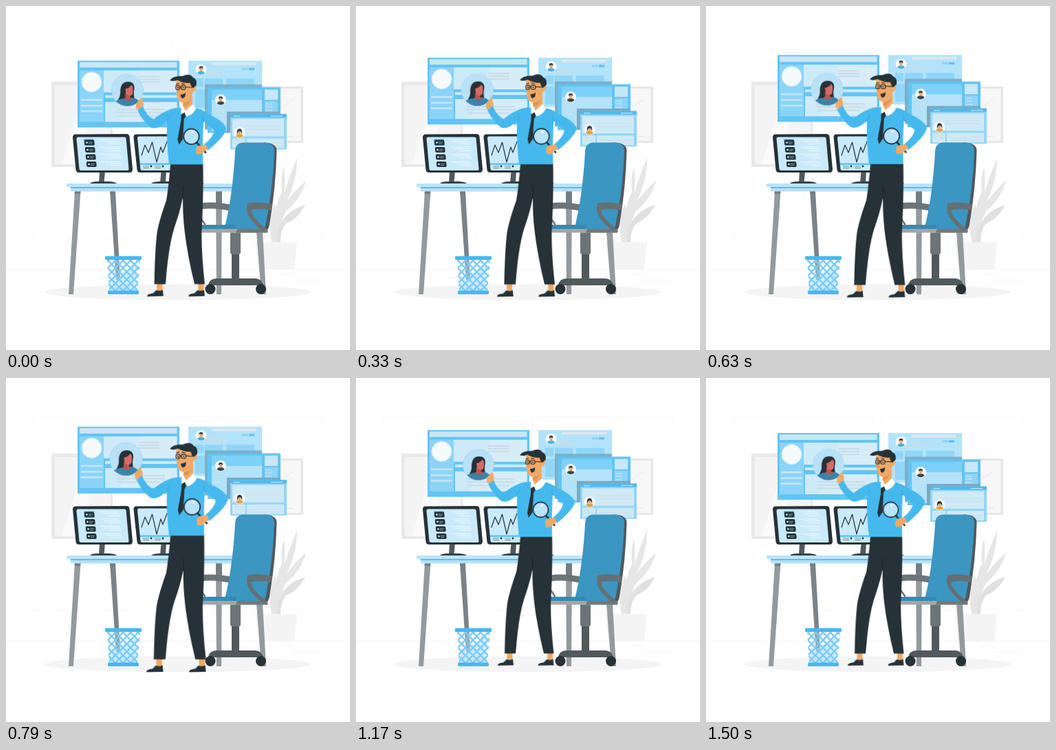
These frames come from a looping animation (500 px wide and 500 px high, 1540 ms). An HTML page without scripts:

```html
<!DOCTYPE html>
<html lang="en">
<head>
<meta charset="utf-8">
<title>Reviewing candidates</title>
<style>
html, body { margin: 0; width: 100%; height: 100%; overflow: hidden; background: #fff; }
svg { display: block; width: 100vw; height: 100vh; }
.windows { animation: float 1540ms linear -40ms infinite; }
.man { transform-origin: 236.5px 260.5px; animation: heartbeat 1540ms linear -40ms infinite; }
@keyframes float { 50% { transform: translateY(-10px); } }
@keyframes heartbeat {
  0%, 30%, 40%, 60%, 100% { transform: scale(1); }
  10%, 50% { transform: scale(1.1); }
}
.dark { fill: #263238; }
.steel { fill: #50595d; }
.grey { fill: #939a9e; }
.blue { fill: #45b9ee; }
.skin { fill: #efa968; }
.line { fill: none; stroke-linecap: round; stroke-linejoin: round; }
</style>
</head>
<body>
<svg viewBox="0 0 500 500" xmlns="http://www.w3.org/2000/svg">
<defs>
  <pattern id="mesh" width="11" height="11" x="148" y="370" patternUnits="userSpaceOnUse">
    <path d="M-1 -1L12 12M12 -1L-1 12" stroke="#7bcbf5" stroke-width="2.4"/>
  </pattern>
  <clipPath id="lens"><circle cx="178" cy="126" r="22.5"/></clipPath>
  <g id="thumb">
    <rect x="-7" y="-4" width="14.5" height="8" rx="2" class="dark" transform="skewX(5)"/>
    <circle cx="-3.5" r="1.3" fill="#d8effa"/>
    <path d="M-1 -.5H5M-1 1.500H4" stroke="#9fd5f2" stroke-width=".6"/>
  </g>
  <g id="avatar">
    <circle r="8" fill="#f5fafc"/>
    <path d="M-5.500 5Q-4.500 2 0 2Q4.500 2 5.500 5Q0 9.500 -5.500 5" fill="currentColor"/>
    <path d="M-2 -3H2V1Q0 4.500 -2 1Z" class="skin"/>
    <path d="M-2.500 -1Q-4 -5 0 -5Q4 -5 2.500 -1L1.500 -2.500H-1.500Z" class="dark"/>
  </g>
  <g id="shoe">
    <path d="M13.500 -19H21.500V-8H13.500Z" class="skin"/>
    <path d="M6 -4L11.500 -9.500L14 -8L12 -3Z" fill="#b4e4fa"/>
    <path d="M0 0Q-.5 -3 5 -4L8.500 -4.500L13 -9Q18 -7 22 -9.500L23 -.5Z" class="dark"/>
  </g>
</defs>

<!-- Room -->
<g fill="none" stroke="#fafafa">
  <rect x="39.500" y="55.500" width="203" height="282"/>
  <rect x="255.500" y="55.500" width="205" height="282"/>
  <path d="M0 382.500H500M400 389.500H418M418 398.500H459M135 395.500H171" stroke="#f4f4f4"/>
</g>
<path d="M66 110H155V234H66Z" fill="#e9e9e9"/>
<path d="M71 115H152V230H71Z" fill="#f4f4f4"/>
<path d="M81 230L106 150H128L103 230Z" fill="#fafafa"/>
<path d="M330 117H432V199H330Z" fill="#e6e6e6"/>
<path d="M334 120H428.500V196H334Z" fill="#f7f7f7"/>
<path d="M398 149L417 136M406 189.500H418" stroke="#e4e4e4"/>
<ellipse cx="249.500" cy="416" rx="194" ry="11.500" fill="#f4f4f4"/>
<path d="M362 343H423L419 383H367Z" fill="#f4f4f4"/>
<g fill="#e6e6e6">
  <path d="M386 343Q380 310 391 287Q396 300 392 343Z"/>
  <path d="M392 343Q386 300 401 270Q399 248 404 234Q407 255 404 273Q414 242 423 221Q423 254 408 284Q424 264 436 254Q429 280 408 297Q398 312 397 343Z"/>
  <path d="M394 343Q393 302 435 289Q424 310 407 316Q399 325 399 343Z" fill="#e0e0e0"/>
</g>

<!-- Floating windows -->
<g class="windows">
  <path d="M104 80H252V177H104Z" fill="#62c5f4"/>
  <path d="M107 82H248.500V90H107Z" fill="#c9e6f3"/>
  <path d="M107 94H142V169H107Z" fill="#8bd4f8"/>
  <path d="M142 94H248.500V126H142ZM144 130H248.500V134H144ZM144 140H248.500V169H144Z" fill="#cdeaf8"/>
  <path d="M195 94H248.500V126H180ZM180 140H248.500V169H165Z" fill="#d6edf8"/>
  <circle cx="124.500" cy="111" r="14.500" fill="#f7fafb" stroke="#c6e9fa"/>
  <path d="M109 137H140M109 145.500H140M109 153.500H140" stroke="#c8e7f6" stroke-width="2.4"/>
  <path d="M192 103H223M192 107H223M192 111H223M161 151H231M161 155.500H231M161 160.500H223" stroke="#c8dbe4" stroke-width="2"/>

  <path d="M265 80H372V152H265Z" fill="#b2e3fa"/>
  <path d="M299 82.500H364V86.500H299Z" fill="#dde8ed"/>
  <path d="M291 96H309M291 100.500H320" stroke="#cddde4" stroke-width="2.200"/>
  <path d="M343 90.500H352V93.500H343Z" fill="#8ad2f6"/>
  <path d="M353 90.500H361V93.500H353Z" fill="#58bdee"/>
  <path d="M275 106H287V118H275ZM289 106H315V118H289ZM320 106H361V118H320ZM275 122H290V148H275Z" fill="#90d6f8"/>
  <use href="#avatar" x="283.500" y="93" color="#49afe0"/>

  <path d="M289 114.500H372V119H294V180H289Z" fill="#7eafc7"/>
  <path d="M293 118.500H399V185H293Z" fill="#63c4f2"/>
  <path d="M299 122H372V137H299Z" fill="#7dd0f8"/>
  <path d="M299 137H372V182H299Z" fill="#b3e2f9"/>
  <path d="M376 122H395V137H376Z" fill="#c6e8f8"/>
  <path d="M376 139H395V182H376Z" fill="#8dd4f7"/>
  <path d="M377 143H387M377 147H387M377 152H387M305 149H319M305 153H321" stroke="#c4e2f0" stroke-width="1.500"/>
  <use href="#avatar" x="312" y="137" color="#34444c"/>

  <path d="M321 154H399V158H326V185H321Z" fill="#79a9c1"/>
  <path d="M326 157.500H408V209H326Z" fill="#91d6f7"/>
  <path d="M326 157.500H408V162.500H326Z" fill="#50b9ed"/>
  <path d="M331 160.500H340M385 160.500H402" stroke="#d2edfa" stroke-width="1.200"/>
  <path d="M329 164.500H404V190H329ZM329 193H348V207H329ZM350 193H404V207H350Z" fill="#cfe9f6"/>
  <path d="M348 175H400M348 180H400M332 196H346M332 200H346M353 200H401M353 204H401" stroke="#c9e2ee" stroke-width="1.300"/>
  <use href="#avatar" x="339.500" y="184.500" color="#e0a23f"/>
  <path d="M336 187Q335 179 339.500 179Q344 179 343 187L341.500 182.500H338Z" class="dark"/>
</g>

<!-- Desk -->
<path d="M100 269H108.500L98 419H91Z" class="grey"/>
<path d="M151 269H159L166 398H160Z" fill="#7b8388"/>
<path d="M305 269H314L313 419H306Z" class="grey"/>
<path d="M100 269H108.500L108 273H99.500ZM151 269H159V273H151ZM305 269H314V287H305Z" fill="#747d81"/>
<path d="M94 263H345V269.500H94Z" fill="#b3e2f9"/>
<rect x="88" y="258" width="257" height="5.500" rx="2" fill="#b9e5fa"/>
<path d="M94 264H345" stroke="#78b4d0" stroke-width="1.800"/>

<!-- Monitors -->
<path d="M136 240H144L142.500 257H135ZM225.500 240H233L232 257H224Z" class="steel"/>
<path d="M122 258Q124 255 134 255H150Q159 255.500 161 258ZM211 258Q214 255 224 255H239Q247 255.500 250 258ZM276 258V255.500Q286 256 288 258Z" fill="#374348"/>
<path d="M101 186.500L175 186Q179 186 179.500 190L184 237Q184 242 180 242H106Q102 242 101.500 238L97 191Q97 186.500 101 186.500Z" class="dark"/>
<path d="M105 190.500H172Q174 190.500 174.500 192L178.500 237Q178.500 239 177 239H109Q107 239 106.500 237L102.500 193Q102.500 190.500 105 190.500Z" fill="#c9eafa"/>
<path d="M189 186.500L263 186L271 242H195Q191 242 190.500 238L185.500 191Q185.500 186.500 189 186.500Z" class="dark"/>
<path d="M193 189.500H262L266 239H198Q196 239 195.500 237L191 192Q191 189.500 193 189.500Z" fill="#c9eafa"/>
<path d="M113 193.500H127.500L128.500 203H114Z" fill="#4fbcee"/>
<use href="#thumb" x="121" y="198.500"/>
<use href="#thumb" x="122" y="209"/>
<use href="#thumb" x="123" y="219.500"/>
<use href="#thumb" x="124" y="230"/>
<path d="M135 194.500H163M141 197H165M149 200H166M136 205H164M142 207.500H166M150 210.500H167M137 215.500H165M143 218H167M151 221H168M138 226.500H166M144 229H168M152 232H169" stroke="#eef8fd" stroke-width="1.200"/>
<path d="M195 228.500H265V231H195Z" fill="#5fc2f1"/>
<path class="line" d="M197 217L202 202L207 213L212.500 198L219 227L225 205L228 213L234 197" stroke="#263238" stroke-width="1.200"/>
<path d="M199 233H208M199.500 235.500H208M216 233H225M216.500 235.500H225" stroke="#718e9b"/>
<circle cx="211" cy="233" r="1.400" class="dark"/><circle cx="228" cy="233" r="1.400" class="dark"/>

<!-- Chair -->
<path d="M364 328H373L378 419H371Z" class="grey"/>
<path class="line" d="M283 291Q302 288 330 294" stroke="#6b7478" stroke-width="9"/>
<path class="line" d="M280 304L289 317" stroke="#6b7478" stroke-width="2.500"/>
<path d="M374 198.500Q394 198.500 393.500 211Q392 265 383 318Q382 325 377 327H366Z" class="steel"/>
<path d="M333 212Q333 199 345 198.500H376Q390 199 390 211Q388 265 378 315Q377 325 371 325H317Q329 280 333 212Z" fill="#3b96c2"/>
<path d="M270 318H335V325H270Z" fill="#3789b3"/>
<path d="M270 324H377Q382 324 380 329.500H270Z" fill="#a0a7aa"/>
<path d="M336 324H377Q382 324 380 329.500H334Z" fill="#70797d"/>
<path class="line" d="M384 291Q365 287 353 292Q351 306 374 324" stroke="#657074" stroke-width="6"/>
<path d="M350 287Q366 283 387 288L385 297Q368 293 355 297Z" fill="#657074"/>
<path d="M326 329.500H341V358Q341 361 338 361H329Q326 361 326 358Z" fill="#6b7478"/>
<path d="M328 361H339V397H328Z" class="steel"/>
<path d="M294 406Q295 396.500 306 396H363Q372 397 374 406Z" class="steel"/>
<circle cx="297" cy="411.500" r="7.500" class="dark"/><circle cx="370.500" cy="411.500" r="7.500" class="dark"/>

<!-- Basket -->
<path d="M147 369H195L191 414H150Z" fill="#d9f0fc" opacity=".25"/>
<path d="M149 400L190 376L188 414H150Z" fill="#a6dcf9" opacity=".5"/>
<path d="M147 369H195L191 414H150Z" fill="url(#mesh)"/>
<rect x="144" y="363.500" width="53" height="5.500" rx="1.500" class="blue"/>
<rect x="148" y="413.500" width="45" height="5.500" rx="1.500" class="blue"/>

<!-- Man with the enlarged portrait -->
<g class="man">
  <circle cx="178" cy="126" r="22.500" fill="#b9e1f5" stroke="#a3d9f4" stroke-width=".8"/>
  <g clip-path="url(#lens)">
    <path d="M162 143Q169 136 168 126Q169 114 179 114Q188 114 188 123Q186 131 188 138Q178 143 162 143Z" class="dark"/>
    <path d="M157 150Q158 140 170 138L186 136.500Q195 138 199 150Z" fill="#3c82a9"/>
    <path d="M175 130H182V136L186 137.500Q180 143 173 138L175 136Z" fill="#b95653"/>
    <path d="M175 124Q181 123 183 119Q186 119 186 124L185.500 131Q182 137 176 131Z" fill="#d66b66"/>
  </g>
  <path d="M191 153Q188 145 193 142Q197 136 199 138Q200 139 199 141Q202 144 200 151Z" class="skin"/>

  <use href="#shoe" x="206" y="418"/>
  <use href="#shoe" x="264.500" y="418"/>
  <path d="M239 230H285Q286 270 283 328Q283 362 287.500 400.500H273Q263 360 259 326Q256 300 256.500 278Q252 300 244 322Q236 348 232 400.500H216Q217 350 220 327Q223 310 233 282Q236 265 239 230Z" class="dark"/>
  <path class="line" d="M257 262L256.500 279" stroke="#1a2327"/>

  <path class="blue" d="M251 151L272 151Q286 153 292 160Q311 167 318 179Q318 190 292 211L286 203Q299 193 301 183L286 170Q284 195 285 231H237Q233 200 234 170Q219 184 210 178Q199 169 192 154L200 149Q205 162 215 167Q226 158 234 155Q242 151 251 151Z"/>
  <path class="line" d="M286 170L284 163M234 170L238 162" stroke="#2f9fd4" stroke-width=".8"/>
  <path d="M257 134H270V150L260 160L256 156Z" class="skin"/>
  <path d="M257 143Q265 143 268 138Q265 148 258 149Z" fill="#e09450"/>
  <path d="M254 152L257 149L260 155L270 146L275 152Q271 161 262 163L258 158L254 162Z" fill="#fff"/>
  <path d="M254 160L259 157.500L260.500 163L258 167L256.500 195L251 203L249 196L254 168Z" class="dark"/>

  <path d="M247 112L268 110L269 118Q276 115 275 123Q274 128 270 129Q270 138 264 142Q256 146 251 141Q246 133 247 112Z" class="skin"/>
  <path d="M238 112Q243 105 256 106Q266 101 271 108Q277 110 275.500 119L271 123Q267 120 267 116Q256 116 249 111.500Q244 114 238 112Z" class="dark"/>
  <path class="line" d="M251 122L249.500 128L252 129" stroke="#d98a49"/>
  <g fill="none" stroke="#263238" stroke-width="1.200">
    <rect x="246.500" y="119.500" width="5.500" height="5.500" rx="1.500"/>
    <rect x="254" y="119.500" width="6" height="5.500" rx="1.500"/>
    <path d="M252 121.500H254M260 121.500L271 122M247 117.500L251 116.500M254.500 116.500L259 117.500"/>
  </g>
  <circle cx="249.500" cy="122.300" r="1" class="dark"/><circle cx="257" cy="122.300" r="1" class="dark"/>
  <path d="M253 132Q258 132 260 129.500Q261 136 256 137.500Q253.500 137 253 132Z" class="dark"/>

  <path class="line" d="M276 200L288.500 214" stroke="#263238" stroke-width="2.600"/>
  <circle cx="268.500" cy="191.500" r="11" fill="#b9e3f8" stroke="#263238" stroke-width="1.700"/>
  <circle cx="270" cy="185" r="2" fill="#e6f5fc"/>
  <path d="M275 209Q276 204 282 204L289 203L292 209Q288 212 284 215Q278 219 275 215Z" class="skin"/>
</g>
</svg>
</body>
</html>
```
